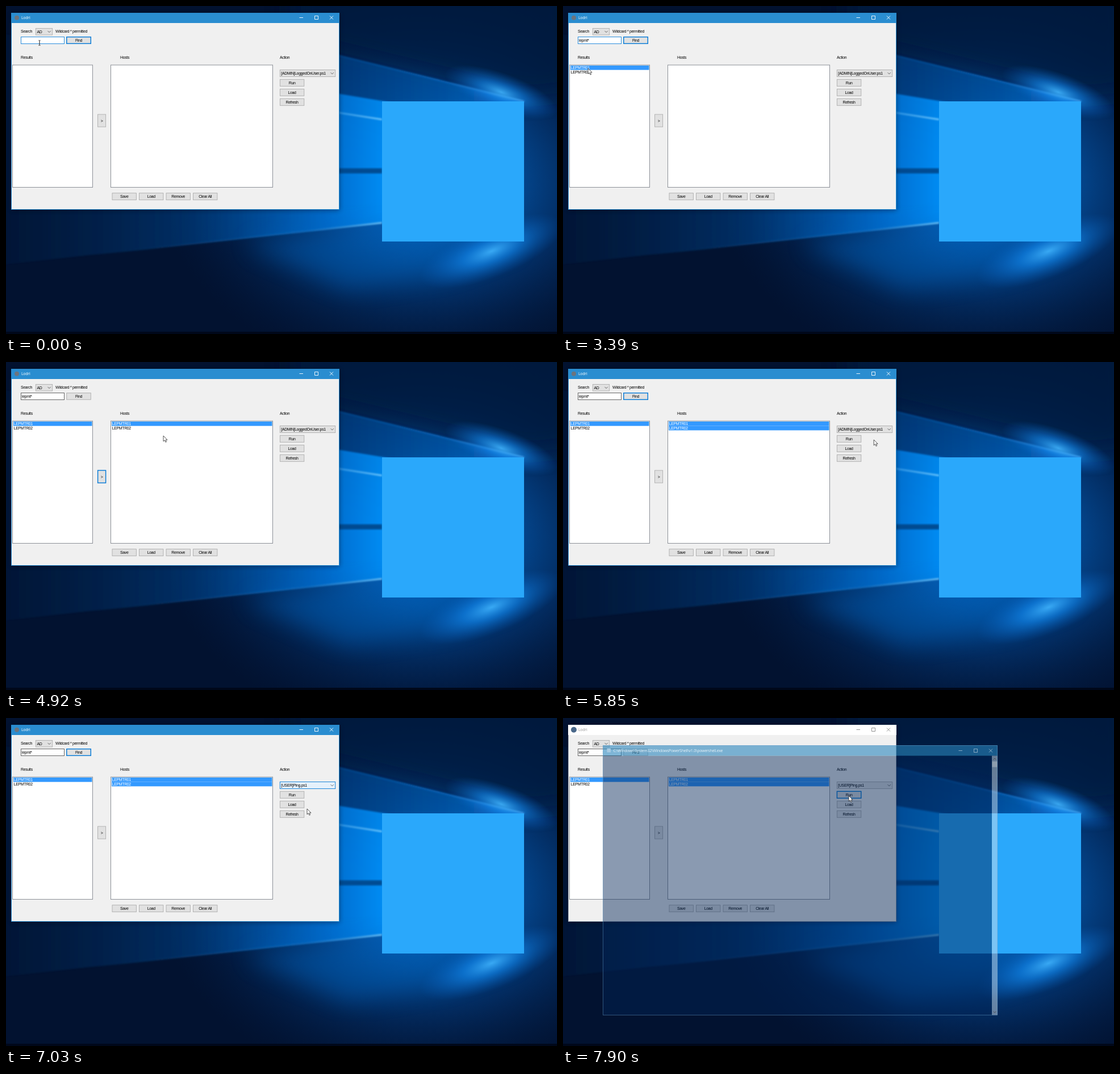
An HTML page that plays this animation: 970x578 px, repeating every 8000 ms.

```html
<!DOCTYPE html>
<html lang="en">
<head>
<meta charset="utf-8">
<title>Host search</title>
<style>
html, body { margin: 0; width: 100%; height: 100%; overflow: hidden; background: #021230; }
svg { display: block; width: 100vw; height: 100vh; }
text { font: 6.9px "Liberation Sans", sans-serif; letter-spacing: -.3px; fill: #000; white-space: pre; }
text.title { font: 7px "Open Sans", sans-serif; letter-spacing: -.28px; fill: #fff; }
.mid { text-anchor: middle; }
.box { fill: #fff; stroke: #8c9097; }
.btn rect { fill: #e1e1e1; stroke: #adadad; stroke-width: .9; }
.btn.default rect { stroke: #0078d7; stroke-width: 1.4; }
.btn.hover rect { fill: #e5f1fb; stroke: #0078d7; }
.btn.pressed rect { fill: #cce4f7; stroke: #00549a; }
.chevron { fill: none; stroke: #444; stroke-width: .8; }
.row rect { fill: none; }
.row.sel rect { fill: #3399ff; }
.row.sel text { fill: #fff; }
#input { fill: #fff; stroke: #666; }
#input.focus { stroke: #2a8ddc; }
#bar { fill: #2a8dd0; }
#controls { fill: none; stroke: #fff; stroke-width: .9; }
#frame { fill: #f0f0f0; stroke: #2a8dd0; }
.inactive #bar { fill: #fff; }
.inactive #frame { stroke: #9aa4b0; }
.inactive #controls { stroke: #888; }
.inactive #appName { fill: #999; }
.inactive #appIcon { fill: #49688a; r: 5px; }
</style>
</head>
<body>
<svg id="stage" viewBox="0 0 970 578" preserveAspectRatio="none">
  <defs>
    <radialGradient id="glow" gradientUnits="userSpaceOnUse" cx="730" cy="310" r="460" gradientTransform="translate(0 78) scale(1 .75)">
      <stop offset="0" stop-color="#0678de"/>
      <stop offset=".3" stop-color="#0459ae" stop-opacity=".9"/>
      <stop offset=".6" stop-color="#033878" stop-opacity=".65"/>
      <stop offset="1" stop-color="#021d48" stop-opacity="0"/>
    </radialGradient>
    <linearGradient id="beam" gradientUnits="userSpaceOnUse" x1="0" y1="0" x2="662" y2="0">
      <stop offset="0" stop-color="#022a5a" stop-opacity=".2"/>
      <stop offset=".5" stop-color="#03448c" stop-opacity=".7"/>
      <stop offset=".85" stop-color="#0570d4"/>
      <stop offset="1" stop-color="#0492fc"/>
    </linearGradient>
    <linearGradient id="shaft" gradientUnits="userSpaceOnUse" x1="560" y1="0" x2="912" y2="0">
      <stop offset="0" stop-color="#023a7c"/>
      <stop offset=".6" stop-color="#0459ac"/>
      <stop offset="1" stop-color="#0a7ce0"/>
    </linearGradient>
    <linearGradient id="ray" gradientUnits="userSpaceOnUse" x1="150" y1="0" x2="912" y2="0">
      <stop offset="0" stop-color="#1a78d0" stop-opacity="0"/>
      <stop offset=".5" stop-color="#1a86e0" stop-opacity=".6"/>
      <stop offset=".67" stop-color="#7fd0ff"/>
      <stop offset="1" stop-color="#b8e6ff"/>
    </linearGradient>
    <linearGradient id="edge" gradientUnits="userSpaceOnUse" x1="580" y1="0" x2="912" y2="0">
      <stop offset="0" stop-color="#0560b8" stop-opacity=".5"/>
      <stop offset=".6" stop-color="#0f80e4" stop-opacity=".8"/>
      <stop offset="1" stop-color="#a8e0ff"/>
    </linearGradient>
    <radialGradient id="flare">
      <stop offset="0" stop-color="#3fb4ff" stop-opacity=".9"/>
      <stop offset=".4" stop-color="#1288ee" stop-opacity=".6"/>
      <stop offset="1" stop-color="#0660c0" stop-opacity="0"/>
    </radialGradient>
    <filter id="soft" x="-20%" y="-20%" width="140%" height="140%"><feGaussianBlur stdDeviation="1.5"/></filter>
    <filter id="wide" x="-30%" y="-30%" width="160%" height="160%"><feGaussianBlur stdDeviation="20"/></filter>
    <filter id="shade" x="-10%" y="-10%" width="120%" height="120%"><feGaussianBlur stdDeviation="4"/></filter>
  </defs>
</svg>
<script>
const LOOP = 8000;
const APP = 'Lodri';
const HOSTS = ['LEPMTR01', 'LEPMTR02'];
const SCRIPTS = ['[ADMIN]LoggedOnUser', '[ADMIN]Netconnections', '[USER]ForTesting', '[USER]PendingReboot',
  '[USER]Ping', '[USER]PolicyUpdate', '[USER]Uptime'].map(name => name + '.ps1');
const ROW = 7.75;

const rect = (x, y, w, h, attrs = '') => `<rect x="${x}" y="${y}" width="${w}" height="${h}" ${attrs}/>`;
const text = (x, y, label, attrs = '') => `<text x="${x}" y="${y}" ${attrs}>${label}</text>`;
const chevron = (x, y) => `<path class="chevron" d="M${x - 2.6} ${y - 1.3}l2.6 2.6 2.6-2.6"/>`;
const button = (id, x, y, w, h, label) =>
  `<g id="${id}" class="btn">${rect(x, y, w, h)}${text(x + w / 2, y + h / 2 + 2.5, label, 'class="mid"')}</g>`;
const combo = (id, x, y, w, h, label) =>
  `<g id="${id}" class="btn">${rect(x, y, w, h)}${text(x + 2, y + h / 2 + 2.7, label)}${chevron(x + w - 5.5, y + h / 2)}</g>`;
const rows = (id, labels, x, y, w) => `<g id="${id}">` + labels.map((label, i) =>
  `<g class="row">${rect(x, y + i * ROW, w, ROW)}${text(x + .7, y + i * ROW + 6, label)}</g>`).join('') + '</g>';
const windowButtons = (x, y) =>
  `M${x} ${y}h6.5M${x + 27} ${y - 3}h6v6h-6zM${x + 53.5} ${y - 3}l6 6m0-6l-6 6`;

const wallpaper = `
  ${rect(0, 0, 970, 578, 'fill="#021230"')}
  ${rect(0, 0, 970, 578, 'fill="url(#glow)"')}
  <path d="M500 -60H1000V150L912 160 500 60z" fill="#021a42" opacity=".75" filter="url(#wide)"/>
  <path d="M540 76L912 168 800 200 540 150z" fill="url(#shaft)" opacity=".75" filter="url(#soft)"/>
  <path d="M0 50L588 155 800 190V300L662 382 0 455z" fill="url(#beam)" opacity=".85" filter="url(#soft)"/>
  <path d="M912 420L662 385 420 420 600 500 780 470z" fill="#0668c4" opacity=".4" filter="url(#wide)"/>
  <path d="M540 76L912 168" fill="none" stroke="url(#edge)" stroke-width="2" filter="url(#soft)"/>
  <path d="M560 184L662 200M150 439L662 382" fill="none" stroke="url(#ray)" stroke-width="2.5" filter="url(#soft)"/>
  ${rect(560, 286, 102, 9, 'fill="#024384" opacity=".85" filter="url(#soft)"')}
  <ellipse cx="872" cy="152" rx="105" ry="34" transform="rotate(20 872 152)" fill="url(#flare)"/>
  <ellipse cx="855" cy="432" rx="135" ry="46" transform="rotate(-22 855 432)" fill="url(#flare)"/>
  ${rect(662, 168, 250, 247, 'fill="#2aa8fb"')}
  ${rect(0, 574, 970, 4, 'fill="#00081a"')}`;

const appWindow = `<g id="app">
  ${rect(10, 14, 577, 346, 'opacity=".4" filter="url(#shade)"')}
  ${rect(9.5, 12.5, 577, 346, 'id="frame"')}
  ${rect(9, 12, 578, 18, 'id="bar"')}
  <circle id="appIcon" cx="19" cy="20.7" r="4" fill="#6c747e"/>
  ${text(27, 23.3, APP, 'id="appName" class="title"')}
  <path id="controls" d="${windowButtons(516.5, 20.5)}"/>
  ${text(26, 47, 'Search')}
  ${combo('source', 52.4, 39.4, 29.2, 11.6, 'AD')}
  ${text(87, 47, 'Wildcard * permitted')}
  ${rect(26.5, 54.5, 76, 12, 'id="input"')}
  ${text(28, 62.6, '', 'id="query"')}
  ${rect(0, 56.5, .8, 8, 'id="caret"')}
  ${button('find', 106.8, 54.6, 42.5, 11.6, 'Find')}
  ${text(26, 92.6, 'Results')}${text(201, 92.6, 'Hosts')}${text(482, 92.6, 'Action')}
  ${rect(11.5, 104, 141, 215.5, 'class="box"')}
  ${rect(184.5, 104, 285, 215.5, 'class="box"')}
  ${rows('results', HOSTS, 13, 104.9, 138.5)}
  ${rows('hosts', HOSTS, 186, 104.9, 282.5)}
  ${button('add', 161.6, 191, 14, 22, '&gt;')}
  ${combo('script', 482.3, 112.6, 97.4, 12, '')}
  ${button('run', 482.4, 129.3, 42.4, 12, 'Run')}
  ${button('load', 482.4, 146.3, 42.4, 12, 'Load')}
  ${button('refresh', 482.4, 163.3, 42.4, 12, 'Refresh')}
  ${['Save', 'Load', 'Remove', 'Clear All'].map((label, i) =>
    button('list' + i, 187 + i * 47.5, 329.7, 42.4, 12, label)).join('')}
  <g id="menu">
    ${rect(484, 127, 97.5, 54, 'opacity=".5"')}
    ${rect(482, 124.8, 97.6, 54.8, 'fill="#fff" stroke="#0078d7" stroke-width=".8"')}
    ${rows('items', SCRIPTS, 482.5, 125.2, 96.6)}
  </g></g>`;

const consoleWindow = `<g id="console">
  ${rect(70, 66.5, 685, 457, 'fill="#012456" opacity=".46"')}
  ${rect(70, 48, 695, 18.5, 'fill="#2a86bd" opacity=".6"')}
  ${rect(755, 66.5, 10, 457, 'fill="#d6e2ec" opacity=".48"')}
  ${rect(755.5, 76.5, 9, 10, 'fill="#a8b4be" opacity=".6"')}
  ${rect(70.5, 48.5, 694, 475, 'fill="none" stroke="#6fa4cc" stroke-width=".8" opacity=".55"')}
  ${rect(77.5, 54, 6.5, 6.5, 'fill="#a9cbe2"')}
  ${text(88.5, 60, 'C:\\Windows\\System32\\WindowsPowerShell\\v1.0\\powershell.exe', 'class="title" opacity=".85"')}
  <path d="${windowButtons(696.5, 57.5)}" fill="none" stroke="#fff" stroke-width=".8" opacity=".6"/>
  <path class="chevron" d="M757.6 73.4l2.4-2.4 2.4 2.4M757.6 517l2.4 2.4 2.4-2.4"/></g>`;

const pointers = `
  <path id="ibeam" d="M-1.8-4.5h1.2q.6 0 .6.6V3.9q0 .6-.6.6H-1.8M1.8-4.5H.6Q0-4.5 0-3.9V3.9q0 .6.6.6H1.8"
    fill="none" stroke="#333" stroke-width=".7"/>
  <path id="arrow" d="M0 0V9.8L2.3 7.8 3.9 11.3 5.5 10.6 4 7.2H7z" fill="#fff" stroke="#111" stroke-width=".7"/>
  <g id="busy"><circle r="5.8" fill="#1c86d2"/><circle r="3" fill="#d8ecfa"/>
    <path d="M-1.3-1.6V.5a1.3 1.3 0 0 0 2.6 0v-2.1" fill="none" stroke="#1c6fb4" stroke-width=".9"/>
    <path d="M-4.2 0A4.2 4.2 0 0 1 0-4.2" fill="none" stroke="#6cc4f4" stroke-width="1.6"/></g>`;

const stage = document.getElementById('stage');
stage.insertAdjacentHTML('beforeend', wallpaper + appWindow + consoleWindow + pointers);
const $ = id => document.getElementById(id);

const typing = [[0, ''], [440, 'l'], [510, 'lep'], [740, 'lepm'], [970, 'lepmt'], [1660, 'lepmt*']];
// [time, x, y] of the pointer
const path = [
  [0, 59, 65], [2540, 59, 65], [2680, 59, 60], [2840, 59, 60], [3450, 42, 117], [3600, 42, 117],
  [4070, 170, 204], [4480, 170, 204], [4720, 474, 150], [4920, 277, 130], [5000, 277, 130],
  [5150, 270, 117], [5480, 270, 117], [5620, 546, 147], [5700, 546, 147], [6040, 549, 122],
  [6260, 549, 122], [6560, 533, 152], [6710, 530, 160], [6960, 530, 160], [7420, 503, 137], [LOOP, 503, 137]
];

const last = (list, t) => list.filter(step => step[0] <= t).pop()[1];
const show = (id, on) => $(id).setAttribute('display', on ? 'inline' : 'none');
const state = (id, name) => $(id).setAttribute('class', ('btn ' + name).trim());
const select = (id, test) => [...$(id).children].forEach((row, i) => row.classList.toggle('sel', test(i)));
const within = (t, from, to) => t >= from && t < to;

function pointerAt(t) {
  const i = path.findIndex(p => p[0] > t);
  const [t0, x0, y0] = path[i - 1], [t1, x1, y1] = path[i];
  // the pointer is sampled about every 75 ms while it moves
  const steps = Math.max(1, Math.round((t1 - t0) / 75));
  const k = Math.floor((t - t0) / (t1 - t0) * steps + 1e-6) / steps;
  return [x0 + (x1 - x0) * k, y0 + (y1 - y0) * k];
}

function draw(t) {
  const [x, y] = pointerAt(t);
  const query = $('query');
  query.textContent = last(typing, t);
  $('caret').setAttribute('x', 28.3 + (query.textContent ? query.getComputedTextLength() : 0));
  show('caret', within(t, 510, 1510) || within(t, 1660, 2610));
  $('input').setAttribute('class', t < 3600 ? 'focus' : '');

  show('results', t >= 2380);
  select('results', i => i === 0 || within(t, 3600, 4380));
  show('hosts', t >= 4380);
  select('hosts', i => i === 0 || t >= 5320);

  state('find', t < 4220 || within(t, 5320, 7650) ? 'default' : '');
  state('add', t < 4070 ? '' : t < 4220 ? 'hover' : t < 4380 ? 'pressed' : t < 4560 ? 'hover' : t < 5320 ? 'default' : '');
  state('run', t < 7350 ? '' : t < 7650 ? 'hover' : t < 7730 ? 'pressed' : t < 7900 ? 'hover' : 'default');

  const open = within(t, 6180, 7030);
  state('script', open ? 'pressed' : within(t, 5960, 7110) ? 'hover' : '');
  $('script').querySelector('text').textContent = SCRIPTS[t < 7030 ? 0 : 4];
  show('menu', open);
  const hot = Math.max(0, Math.floor((y - 125.2) / ROW));
  select('items', i => i === hot);

  const busy = within(t, 7730, 7900);
  const overInput = y < 66.5 && x < 103;
  show('ibeam', overInput && !within(t, 440, 2290));
  show('arrow', !overInput && !busy);
  show('busy', busy);
  for (const id of ['ibeam', 'arrow']) $(id).setAttribute('transform', `translate(${x} ${y})`);
  $('busy').setAttribute('transform', `translate(${x} ${y - 1})`);

  $('app').setAttribute('class', t >= 7900 ? 'inactive' : '');
  show('console', t >= 7900);
}

function tick() {
  draw(performance.now() % LOOP);
  requestAnimationFrame(tick);
}
tick();
</script>
</body>
</html>
```
